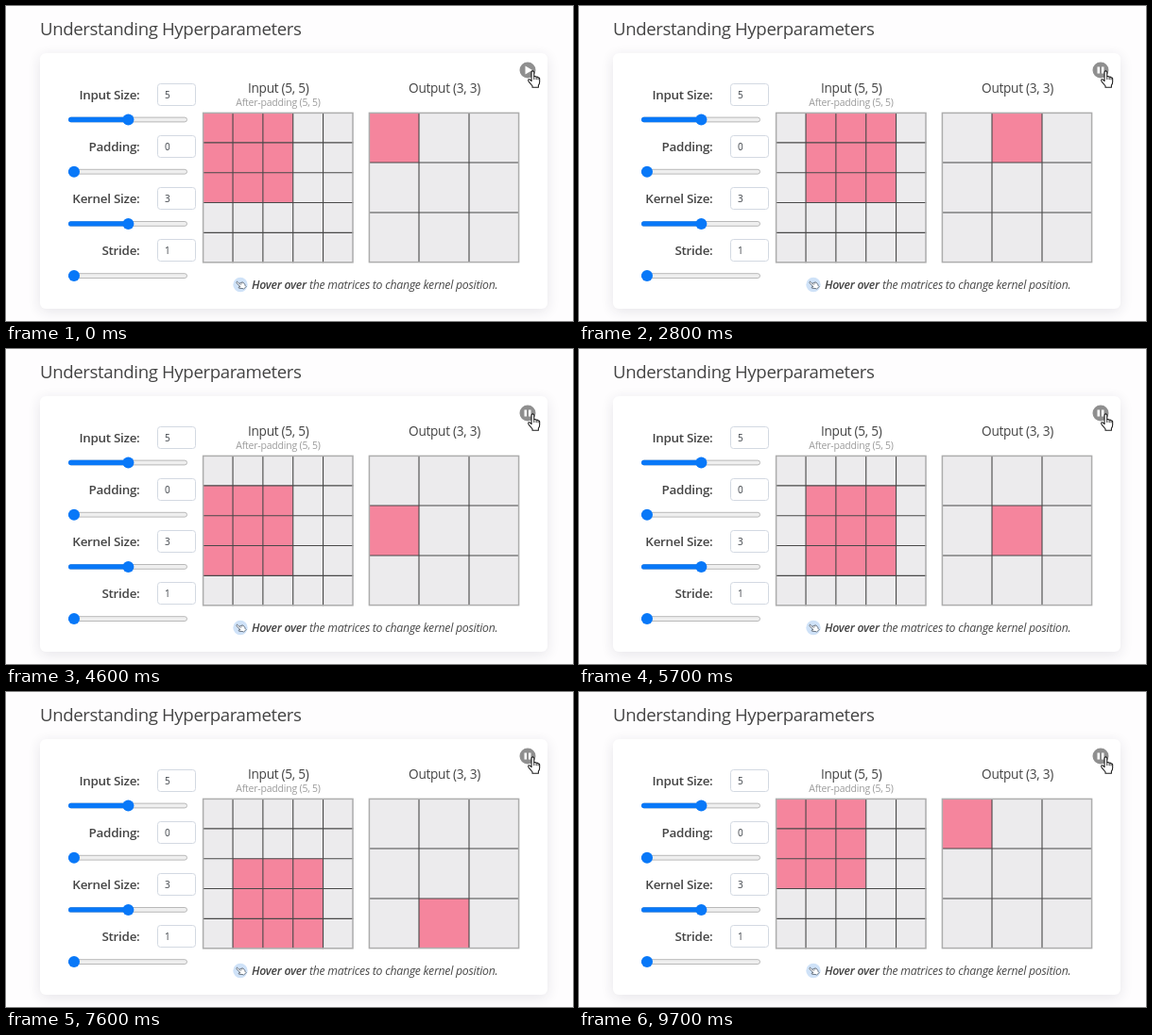
Animation, 600 px wide and 334 px high, one loop 9800 ms. Source, as an HTML page with a canvas:

```html
<!DOCTYPE html>
<html lang="en">
<head>
<meta charset="utf-8">
<title>Understanding Hyperparameters</title>
<style>
html, body { margin: 0; width: 100%; height: 100%; overflow: hidden; background: #fefdfe; }
canvas { display: block; width: 600px; height: 334px; }
</style>
</head>
<body>
<canvas id="stage" width="600" height="334"></canvas>
<script>
const ctx = document.getElementById('stage').getContext('2d');
const LOOP = 9800;
const PLAY_AT = 1300;
// Moments at which the kernel moves on by one place
const STEPS = [2400, 3000, 3800, 4700, 5900, 7000, 7500, 8500, 9600];
const PINK = '#f5859d', CELL = '#ecebed', BLUE = '#0878f8';

const HAND = new Path2D('M4 11.2V1.6a1.4 1.4 0 0 1 2.8 0V6.2q1.4-.8 2.4.5q1.3-.5 2 .6' +
  'q1.5-.2 1.6 1.4V12q0 2-1.3 3.6V18H5V16.4L1 11.6Q0 9.8 1.2 9.3q1.2-.3 2.8 1.9z');
const KNUCKLES = new Path2D('M6.8 6v3.6M9.2 6.8v2.9M11.2 7.5v2.3');

function text(str, x, y, size, color, { style = '', align = 'left' } = {}) {
  ctx.font = `${style} ${size}px "Open Sans", "Noto Sans", sans-serif`;
  ctx.letterSpacing = (-0.02 * size).toFixed(3) + 'px';
  ctx.textAlign = align;
  ctx.fillStyle = color;
  ctx.fillText(str, x, y);
}

function pill(x, y, w, h, r, fill, stroke) {
  ctx.beginPath();
  ctx.roundRect(x, y, w, h, r);
  ctx.fillStyle = fill;
  ctx.fill();
  if (stroke) {
    ctx.strokeStyle = stroke;
    ctx.lineWidth = 1;
    ctx.stroke();
  }
}

function disc(x, y, r, color) {
  ctx.beginPath();
  ctx.arc(x, y, r, 0, Math.PI * 2);
  ctx.fillStyle = color;
  ctx.fill();
}

// Pointing hand centred on x, y
function hand(x, y, scale, angle, line, width) {
  ctx.save();
  ctx.translate(x, y);
  ctx.rotate(angle);
  ctx.scale(scale, scale);
  ctx.translate(-6.5, -9);
  ctx.fillStyle = '#fff';
  ctx.fill(HAND);
  ctx.strokeStyle = line;
  ctx.lineWidth = width;
  ctx.lineJoin = 'round';
  ctx.stroke(HAND);
  ctx.lineWidth = width * 0.8;
  ctx.stroke(KNUCKLES);
  ctx.restore();
}

function card() {
  ctx.save();
  ctx.shadowColor = 'rgba(40, 40, 60, 0.11)';
  ctx.shadowBlur = 14;
  ctx.shadowOffsetY = 3;
  pill(36, 50, 537, 271, 6, '#fff');
  ctx.restore();
}

function control(label, value, thumb, row) {
  const y = row * 55;
  text(label, 141.5, 98.7 + y, 13.4, '#444', { style: '600', align: 'right' });
  pill(160.5, 82.5 + y, 40, 23, 3, '#fff', '#d3d9e2');
  text(value, 168, 97.7 + y, 10, '#3a3f45');
  const mid = 120.5 + row * 55.2;
  pill(66.5, mid - 2.4, 125, 4.8, 2.4, '#efefef', '#b9b9b9');
  pill(66, mid - 2.7, thumb - 66, 5.4, 2.7, BLUE);
  disc(thumb, mid, 6, BLUE);
}

// Square matrix with n cells a side and a k by k highlight
function matrix(x, y, side, n, k, col, row) {
  const cell = side / n;
  ctx.fillStyle = CELL;
  ctx.fillRect(x, y, side, side);
  ctx.fillStyle = PINK;
  ctx.fillRect(x + col * cell, y + row * cell, k * cell, k * cell);
  ctx.strokeStyle = '#484848';
  ctx.lineWidth = 1.1;
  ctx.beginPath();
  for (let i = 1; i < n; i++) {
    const gx = x + i * cell, gy = y + i * cell;
    ctx.moveTo(gx, y);
    ctx.lineTo(gx, y + side);
    ctx.moveTo(x, gy);
    ctx.lineTo(x + side, gy);
  }
  ctx.stroke();
  ctx.strokeStyle = '#adadad';
  ctx.lineWidth = 1.5;
  ctx.strokeRect(x + 0.4, y + 0.4, side - 0.8, side - 0.8);
}

function button(playing) {
  disc(552, 68, 8.5, '#8f8f8f');
  ctx.fillStyle = '#fff';
  if (playing) {
    ctx.fillRect(548.5, 64.5, 2.5, 7);
    ctx.fillRect(553, 64.5, 2.5, 7);
  } else {
    ctx.beginPath();
    ctx.moveTo(549.5, 63.5);
    ctx.lineTo(557, 68);
    ctx.lineTo(549.5, 72.5);
    ctx.fill();
  }
  hand(558.5, 77.5, 0.98, 0, '#1c1c1c', 1.1);
}

function draw(t) {
  const pos = STEPS.filter(s => t >= s).length % 9;
  const col = pos % 3, row = Math.floor(pos / 3);

  ctx.fillStyle = '#fefdfe';
  ctx.fillRect(0, 0, 600, 334);
  text('Understanding Hyperparameters', 36, 30.5, 18.62, '#444');
  card();

  control('Input Size:', '5', 129.4, 0);
  control('Padding:', '0', 72, 1);
  control('Kernel Size:', '3', 129.4, 2);
  control('Stride:', '1', 72, 3);

  text('Input (5, 5)', 288.2, 92, 13.65, '#444', { align: 'center' });
  text('After-padding (5, 5)', 288, 106, 10.5, '#9b9b9b', { align: 'center' });
  text('Output (3, 3)', 464, 92, 13.65, '#444', { align: 'center' });
  matrix(208.2, 113, 159.2, 5, 3, col, row);
  matrix(384, 113, 159, 3, 1, col, row);

  disc(248, 295.5, 7.7, '#cfe2f8');
  hand(248.2, 295.8, 0.6, -Math.PI / 4, '#4c5866', 1.3);
  text('Hover over', 260, 300.2, 12.3, '#444', { style: 'italic 600' });
  text('the matrices to change kernel position.', 321, 300.2, 12.3, '#4a4a4a', { style: 'italic' });

  button(t >= PLAY_AT);
}

const start = performance.now();
function tick() {
  draw((performance.now() - start) % LOOP);
  requestAnimationFrame(tick);
}
tick();
</script>
</body>
</html>
```
